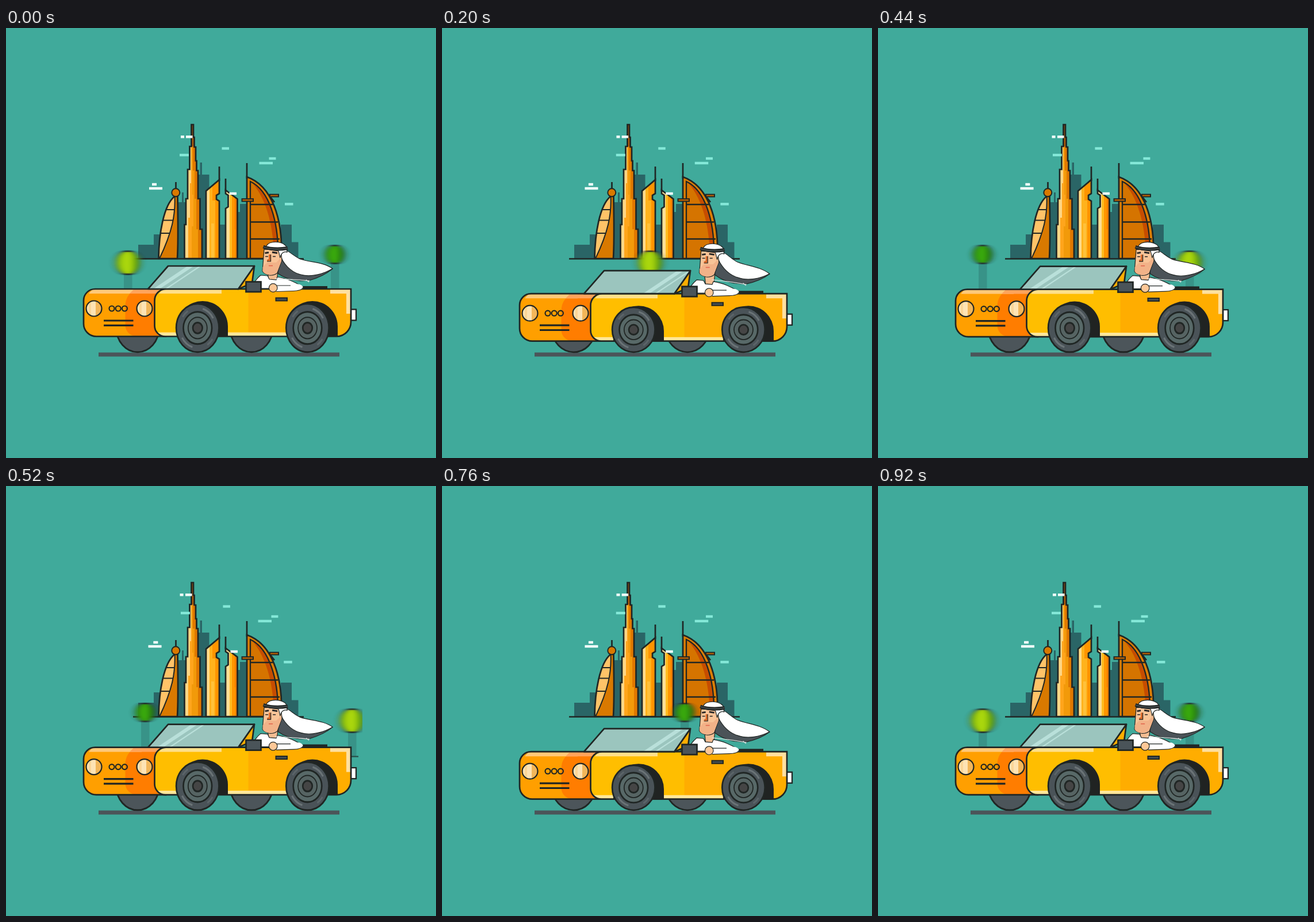
These frames come from a looping animation (748 px wide and 748 px high, 0.96 s). An HTML page:

```html
<!DOCTYPE html>
<html lang="en">
<head>
<meta charset="utf-8">
<title>City drive</title>
<style>
html, body { margin: 0; width: 100%; height: 100%; overflow: hidden; background: #40aa9b; }
svg { display: block; width: 100vw; height: 100vh; }
.ink { stroke: #202624; }
.line { fill: none; }
.thin { stroke: #202624; stroke-width: 1.2; }
</style>
</head>
<body>
<svg viewBox="0 0 748 748" stroke-width="2.700">
<defs>
  <path id="tall" d="M322.5 168H326V190H327.5V207H330V231H331.5V248H334V297H337.5V350H341V401H310.5V342H313V297H316V246H319.5V206H322.5Z"/>
  <path id="mid" d="M348 401V283.500L371 264V288L366 291V298L371 301V401Z"/>
  <path id="slim" d="M382 282L402.500 297.500V401H382V314L386.500 311V291L382 288Z"/>
  <path id="leaf" d="M265.500 401C266 358 274 309 293 293H298.500C299 330 300 370 298 401Z"/>
  <path id="sail" d="M419 259C462 274 482 330 479 401H419Z"/>
  <path id="glass" d="M247 454L282 414H432L404 454Z"/>
  <path id="face" d="M278 536.500H157A22 22 0 0 1 135 514.500V474A20 20 0 0 1 155 454H278Z"/>
  <path id="side" d="M278 454H600V511A25 25 0 0 1 575 536.500H277A18.500 18.500 0 0 1 258.500 518V474A20 20 0 0 1 278 454Z"/>
  <clipPath id="cTall"><use href="#tall"/></clipPath>
  <clipPath id="cMid"><use href="#mid"/></clipPath>
  <clipPath id="cSlim"><use href="#slim"/></clipPath>
  <clipPath id="cLeaf"><use href="#leaf"/></clipPath>
  <clipPath id="cSail"><use href="#sail"/></clipPath>
  <clipPath id="cGlass"><use href="#glass"/></clipPath>
  <clipPath id="cFace"><use href="#face"/></clipPath>
  <clipPath id="cSide"><use href="#side"/></clipPath>
  <clipPath id="window"><rect x="120" y="124" width="500" height="500"/></clipPath>
  <filter id="blur" x="-60%" y="-10%" width="220%" height="120%">
    <feGaussianBlur stdDeviation="5.500 0"/>
  </filter>
  <g id="lamp">
    <circle r="13.500" fill="#fde3b4"/>
    <path d="M3 -13.100A13.500 13.500 0 0 1 3 13.100Z" fill="#f3b659"/>
    <path d="M-7 -11V11" stroke="#fbd698" stroke-width="4"/>
    <circle r="13.500" class="ink line" stroke-width="2.200"/>
  </g>
  <g id="wheel" class="ink">
    <circle r="37.200" fill="#4a5358"/>
    <g fill="none" stroke="#6a7376" stroke-width="3">
      <path d="M9 -29.500A31 31 0 0 1 27 -15M-9 29.500A31 31 0 0 1 -27 15"/>
      <path d="M26 17A31 31 0 0 1 17 26M-26 -17A31 31 0 0 1 -17 -26" stroke="#5b6468"/>
    </g>
    <circle r="24.800" fill="#586968"/>
    <circle r="16.500" fill="#566463" stroke-width="1.800"/>
    <circle r="8.300" fill="#454545"/>
  </g>
</defs>

<rect width="748" height="748" fill="#40aa9b"/>

<g id="city">
  <path fill="#2a6566" d="M230 401V377H257V359H270V401ZM299 401V303H306V286H309V303H333V255H337.500V234H341V255H353.500V342H382V401ZM372 401V342H403V320H407V306H418V401ZM478 401V342H497V372.500H508.500V401Z"/>

  <g clip-path="url(#cLeaf)">
    <use href="#leaf" fill="#d97900"/>
    <path d="M293 291C295 325 289 355 267 401H255V291Z" fill="#ffc368"/>
    <path d="M276 316H292M270 334.500H290M265 357H285" class="ink" stroke-width="2.200"/>
    <path d="M293.500 293C295 325 289 355 267 401" class="ink line" stroke-width="2"/>
  </g>
  <use href="#leaf" class="ink line"/>
  <path d="M295.500 268V280" class="ink"/>
  <circle cx="295.300" cy="286.300" r="7" class="ink" fill="#d97900" stroke-width="2"/>

  <g clip-path="url(#cTall)">
    <rect x="305" y="160" width="40" height="245" fill="#f29a0a"/>
    <path d="M310 401V342H313V297H316V246H319V206H322V270H320V330H317V401Z" fill="#ffd685"/>
    <path d="M317 401V330H320V270H322V206H324V290H326V345H323V401Z" fill="#ffa51c"/>
    <path d="M324 168H345V401H334V350H331V297H328V248H325Z" fill="#e07800"/>
    <rect x="320" y="166" width="8" height="40" fill="#b85c08"/>
  </g>
  <use href="#tall" class="ink line"/>

  <g clip-path="url(#cMid)">
    <rect x="348" y="260" width="24" height="142" fill="#ffb21c"/>
    <rect x="348" y="260" width="6" height="142" fill="#ffdb8a"/>
    <path d="M359 260H372V401H364V300H359Z" fill="#ff9400"/>
    <path d="M362 401V340H357V401Z" fill="#ffc13a"/>
  </g>
  <use href="#mid" class="ink line"/>
  <path d="M371 241V266" class="ink"/>

  <g clip-path="url(#cSlim)">
    <rect x="382" y="280" width="21" height="122" fill="#ffbc22"/>
    <rect x="382" y="280" width="7" height="122" fill="#ffdf96"/>
    <rect x="393" y="280" width="10" height="122" fill="#ff9600"/>
    <path d="M398 280H403V401H399V350H398Z" fill="#f07b00"/>
  </g>
  <use href="#slim" class="ink line"/>
  <path d="M382 262V284" class="ink"/>

  <g clip-path="url(#cSail)">
    <use href="#sail" fill="#dc7e05"/>
    <path d="M425 267C457 282 475 335 473 401H425Z" fill="#d57400"/>
    <path d="M428 269C457 284 475 335 473 401H466C466 350 455 300 428 269Z" fill="#c74d00"/>
    <path d="M425 401V267C457 282 475 335 473 401M425 307H464M425 337.500H473M425 367H476" class="ink line" stroke-width="2.300"/>
  </g>
  <use href="#sail" class="ink line"/>
  <path d="M419 235V262M460 294L467 303" class="ink"/>
  <path d="M410.500 297.300H430V301.500H410.500ZM459 289.500H474V293.500H459Z" class="ink" fill="#c96600" stroke-width="2"/>
  <path d="M221 401.500H518" class="ink"/>
</g>

<g id="clouds"></g>
<g id="trees" clip-path="url(#window)"></g>

<rect x="161" y="564.500" width="419" height="7" fill="#4b5459"/>
<g id="rear"></g>

<g id="car">
  <path d="M515 451.500H559" class="ink" stroke-width="5"/>
  <rect x="600" y="489.500" width="9" height="19" fill="#fff" class="ink" stroke-width="2.300"/>
  <g clip-path="url(#cFace)">
    <use href="#face" fill="#ff9f00"/>
    <path d="M290 454H226Q207.500 464 207.500 484V518Q209 533 226 537H290Z" fill="#ff7d00"/>
    <path d="M150 455H236V462H144Z" fill="#ffc97a"/>
    <path d="M222 455H280V462H215Z" fill="#ffa45c"/>
  </g>
  <use href="#face" class="ink line"/>
  <use href="#lamp" x="153" y="488"/>
  <use href="#lamp" x="241" y="488"/>
  <g class="ink line" stroke-width="2.200">
    <circle cx="184" cy="488" r="4.500"/><circle cx="195.200" cy="488" r="4.500"/><circle cx="206.400" cy="488" r="4.500"/>
  </g>
  <path d="M170 509H221.500M170 517.300H221.500" class="ink" stroke-width="3.200"/>

  <g clip-path="url(#cSide)">
    <use href="#side" fill="#ffbe00"/>
    <rect x="421.500" y="450" width="190" height="90" fill="#ffad00"/>
    <path d="M272 455H375V462H266Z" fill="#ffe08a"/>
    <path d="M564 455H599V497H592V462H564Z" fill="#ffe0a0"/>
    <path d="M262 529.500H490V537H270Z" fill="#ffe79a"/>
  </g>
  <use href="#side" class="ink line"/>
  <path d="M298 537V519A44 44 0 0 1 386 519V537ZM489 537V519A44 44 0 0 1 577 519V537Z" fill="#202322"/>

  <path d="M432 414L428 444L404 454Z" fill="#ffae00" class="ink" stroke-linejoin="round"/>
  <g clip-path="url(#cGlass)">
    <use href="#glass" fill="#9bc5be"/>
    <g id="shine" fill="#b9e0da"><path d="M0 454H11L71 414H60ZM20 454H24L84 414H80Z"/></g>
  </g>
  <use href="#glass" class="ink line" stroke-linejoin="round"/>
  <rect x="469.500" y="469.500" width="19.500" height="5" fill="#454d52" class="ink" stroke-width="2"/>
</g>

<g id="neck"><path d="M455 422H473L471 443H457Z" fill="#f5bd92" class="thin"/></g>
<g id="shirt">
  <path d="M428 453C432 441 436 436 443 430L455 431L458 437L470 438L472 433C488 435 506 443 516 451L500 453Z" fill="#fff" class="thin"/>
  <path d="M468 446.500C480 444 500 444 511 446Q518 449 516.500 453Q513 457 500 457.500L470 458.500Z" fill="#fff"/>
  <path d="M470 448H495M517 451Q515 457 500 457.500L470 458.500" class="thin line"/>
  <circle cx="464.700" cy="452" r="7.300" fill="#fdc797" class="thin"/>
  <rect x="417.500" y="441.500" width="26" height="17.500" fill="#4a5459" class="ink"/>
</g>

<g id="head">
  <g id="scarf">
    <path d="M476 396L473 427C488 438 508 441 528 439Q552 432 568 419L500 400Z" fill="#4b5358" class="thin"/>
    <path d="M468 436Q500 437 528 440M522 438L527 442" fill="none" stroke="#d8e2e0" stroke-width="1.300"/>
    <path d="M477 388C490 382 496 395 512 402C530 408 552 407 568 418.500C553 428 530 434 513 429C495 425 481 409 477 394Z" fill="#fff" class="thin"/>
  </g>
  <path d="M449 385L446 423Q449 428 458 430Q466 431 472 426L480 404L478 386Z" fill="#f9c497" class="thin"/>
  <path d="M446.500 416L454 408H470L478 400L479 406L471 426Q464 431 456 429Q449 428 446.500 423Z" fill="#f2b288"/>
  <path d="M457 394H460.500L460 406H454V403L457 402Z" fill="#d9692a"/>
  <path d="M460.500 394V406H454" class="thin line"/>
  <path d="M450.500 391.500L457 390.500M463 390L472 391.500" stroke="#262626" stroke-width="2.800"/>
  <path d="M451 397.500H456M464 397.500H469" stroke="#262626" stroke-width="1.500"/>
  <path d="M457 413.500H464" stroke="#e2674e" stroke-width="1.600"/>
  <path d="M449 384L453 379C458 370 479 370 487 379L489 390C483 388 478 392 477 400L474 388Z" fill="#fff" class="thin"/>
  <path d="M447.500 380.500Q466 387 490 383" fill="none" stroke="#252928" stroke-width="6"/>
  <path d="M448 381Q466 387 489.500 383" fill="none" stroke="#667074" stroke-width=".8"/>
</g>
<g id="front"></g>
</svg>

<script>
const NS = "http://www.w3.org/2000/svg";
const STEP = 40, COUNT = 24;
const el = id => document.getElementById(id);
const move = (node, x, y, extra = "") => node.setAttribute("transform", `translate(${x} ${y}) ${extra}`);

function add(parent, tag, attrs) {
  const node = document.createElementNS(NS, tag);
  for (const key in attrs) node.setAttribute(key, attrs[key]);
  parent.appendChild(node);
  return node;
}

// x, y, width, drift, colour
const clouds = [
  [304, 189.3, 6, -1.5, "#f2fffc"], [313, 189.3, 11.5, -1, "#f2fffc"],
  [302, 221, 16, 2, "#84e8d8"], [375.5, 209.5, 12.5, 2, "#84e8d8"],
  [457.5, 227, 12, 4, "#84e8d8"], [440.5, 235, 23.5, -2, "#84e8d8"],
  [485, 306.3, 14.5, -1.8, "#84e8d8"], [254, 272, 8, 2.4, "#f2fffc"],
  [249, 279, 23, -1.5, "#f2fffc"], [388.5, 288, 12.5, 2, "#f2fffc"]
].map(([x, y, width, drift, fill]) => ({
  x, drift, node: add(el("clouds"), "rect", { y: y - 2.2, width, height: 4.4, fill })
}));

function makeTree(start, y, r, foot, [base, glow, shade]) {
  const node = add(el("trees"), "g", {});
  add(node, "rect", { x: -7, y, width: 14.5, height: foot - y, fill: "#2b6a66", opacity: 0.36 });
  add(node, "rect", { x: -8, y: foot - 1, width: 19, height: 2.2, fill: "#23413d", opacity: 0.85 });
  const crown = add(node, "g", { filter: "url(#blur)" });
  add(crown, "circle", { cy: y, r, fill: base });
  add(crown, "ellipse", { cx: -1, cy: y, rx: r * 0.5, ry: r, fill: glow });
  add(crown, "path", { d: `M${r * 0.4} ${y - r * 0.9}A${r} ${r} 0 0 1 ${r * 0.4} ${y + r * 0.9}Z`, fill: shade });
  add(crown, "circle", { cy: y, r, class: "ink line" });
  return { start, node };
}
const trees = [
  makeTree(572, 394, 16, 459.5, ["#2f9410", "#3aac0c", "#207a08"]),
  makeTree(212, 408.3, 20.5, 470.5, ["#86be0c", "#acd80c", "#66a808"])
];

const rear = [229, 427].map(x => ({ x, node: add(el("rear"), "circle", { r: 37.2, fill: "#4c555a", class: "ink" }) }));
const front = [333.3, 524.5].map(x => ({ x, node: add(el("front"), "use", { href: "#wheel" }) }));

function draw(ms) {
  const frame = Math.floor(ms / STEP) % COUNT;
  const wave = n => (1 - Math.cos(2 * Math.PI * frame / n)) / 2;
  const slow = wave(24), k = wave(12);

  for (const c of clouds) c.node.setAttribute("x", c.x + c.drift * slow);
  // One lap is 720 px; crowns re-enter from the left of the window
  for (const t of trees) move(t.node, (t.start + 30 * frame + 60) % 720 - 60, 0);

  const drop = 8.8 * k;
  move(el("car"), 0, drop);
  move(el("shirt"), 0, drop);
  move(el("shine"), 256 + 100 * k, 0);

  const hub = 521.8 + 3.2 * k;
  const squash = (563.8 - hub) / 37.2;
  for (const w of [...rear, ...front]) move(w.node, w.x, hub, `scale(1 ${squash})`);

  move(el("neck"), 1.8 * k, 6 * k);
  move(el("head"), 1.8 * k, 3.2 * k);
  move(el("scarf"), 0, 0, `translate(484 0) skewY(${4.4 * k}) translate(-484 0)`);
}

function tick(now) {
  draw(now);
  requestAnimationFrame(tick);
}
draw(0);
requestAnimationFrame(tick);
</script>
</body>
</html>
```
